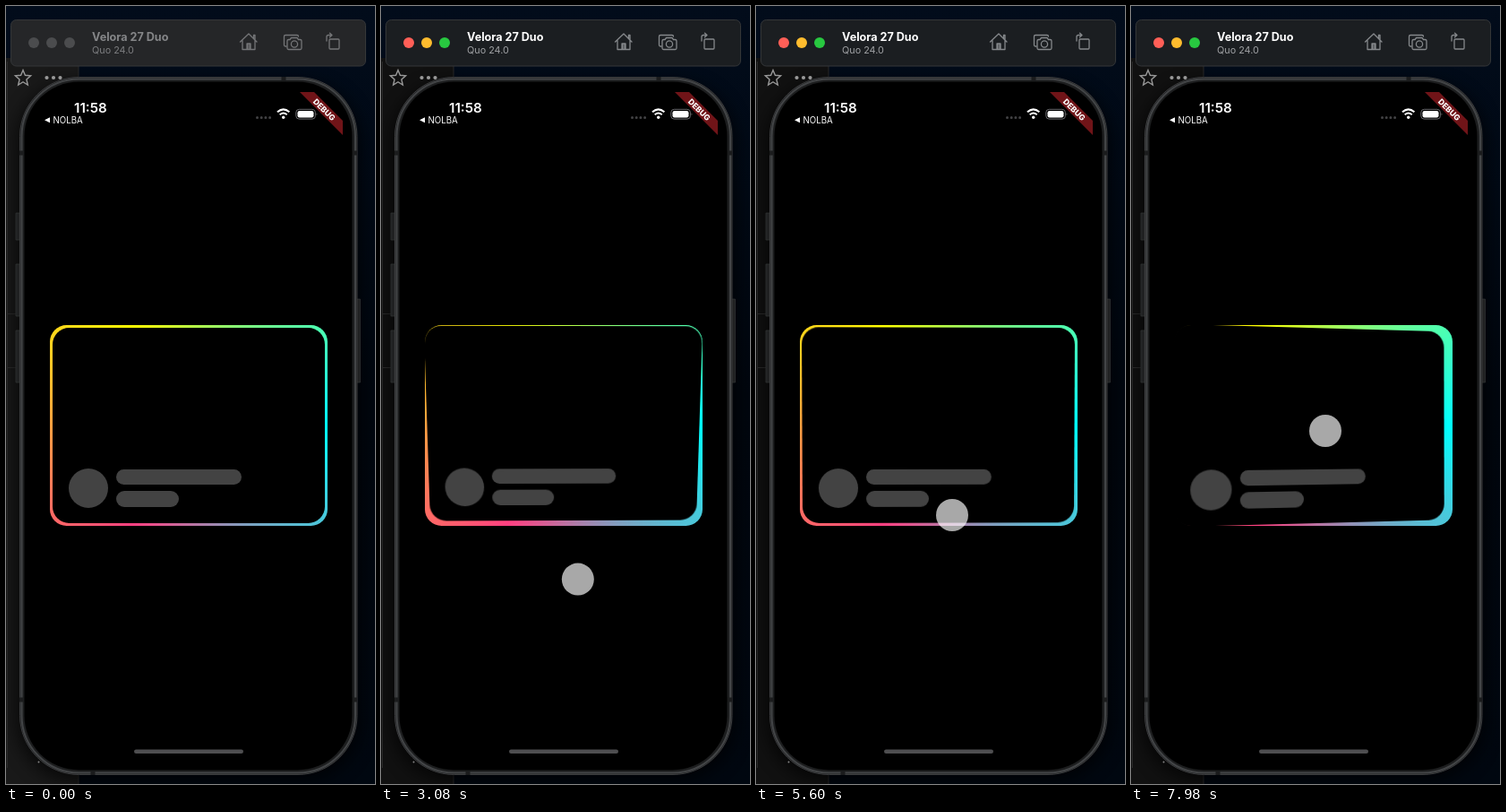
An HTML page for the animation above (8 s loop, 412x868 px).

```html
<!DOCTYPE html>
<html lang="en">
<head>
<meta charset="utf-8">
<title>Tilting card</title>
<style>
  html, body { margin: 0; width: 100%; height: 100%; overflow: hidden; background: #000; }
  #stage { position: absolute; inset: 0; width: 412px; height: 868px; overflow: hidden; --on: 0%; }
  #stage > *, #inner > * { position: absolute; }
  svg { left: 0; top: 0; font-family: Inter, sans-serif; }
  .bar { fill: color-mix(in srgb, #252628, #1b1e21 var(--on)); }
  .title { fill: color-mix(in srgb, #858688, #fff var(--on)); }
  .sub { fill: color-mix(in srgb, #7d7e80, #a0a2a5 var(--on)); }
  .icon { stroke: color-mix(in srgb, #747577, #85888b var(--on)); }
  .window { fill: color-mix(in srgb, #191919, #111 var(--on)); }
  .red { fill: color-mix(in srgb, #4b4c4e, #ff5f57 var(--on)); }
  .amber { fill: color-mix(in srgb, #4b4c4e, #febc2e var(--on)); }
  .green { fill: color-mix(in srgb, #4b4c4e, #28c840 var(--on)); }
  #card {
    left: 49px; top: 356.2px; width: 310px; height: 223.6px; border-radius: 18.6px;
    background: conic-gradient(from 90deg, #0ff, #ff4081, #ff0, #0ff);
  }
  #inner { left: 51.8px; top: 359px; width: 304.4px; height: 218px; border-radius: 18.6px; background: #000; }
  #inner > * { background: #434343; border-radius: 22px; }
  #avatar { left: 18px; top: 156.6px; width: 44px; height: 44px; }
  #line1 { left: 70.5px; top: 157.6px; width: 140px; height: 17.7px; }
  #line2 { left: 70.5px; top: 182.1px; width: 70px; height: 17.7px; }
  #finger {
    left: -18px; top: -18px; width: 36px; height: 36px; border-radius: 50%;
    background: rgba(255,255,255,.66);
  }
</style>
</head>
<body>
<div id="stage">
  <svg width="412" height="868">
    <defs>
      <linearGradient id="sky" x1="0" y1="0" x2="0" y2="1">
        <stop offset="0" stop-color="#020c1b"/><stop offset=".5" stop-color="#00060e"/><stop offset="1" stop-color="#000710"/>
      </linearGradient>
      <filter id="soft" x="-20%" y="-20%" width="140%" height="140%"><feGaussianBlur stdDeviation="10"/></filter>
    </defs>
    <rect width="412" height="868" fill="url(#sky)"/>

    <!-- window behind the phone -->
    <path class="window" d="M0 58H81V868H0Z"/>
    <path d="M1.5 62V850M81 66V868M2 343.5H15M2 403.5H15" fill="none" stroke="#2b2b2b"/>
    <rect x="12" y="86" width="384" height="778" rx="66" opacity=".7" filter="url(#soft)"/>
    <path d="M19 71.5L21.4 77.3L27.6 77.8L22.9 81.9L24.3 88L19 84.7L13.7 88L15.1 81.9L10.4 77.8L16.6 77.3Z" fill="none" stroke="#999" stroke-width="1.4"/>
    <g fill="#999"><circle cx="45.5" cy="80" r="2.1"/><circle cx="53" cy="80" r="2.1"/><circle cx="60.5" cy="80" r="2.1"/></g>

    <!-- phone body -->
    <path d="M11 231H16V261H11ZM11 288H16V346H11ZM11 362H16V420H11ZM391 327H395.5V420H391Z" fill="#202122" stroke="#333435" stroke-width=".7"/>
    <rect x="15.5" y="79.5" width="376.5" height="778" rx="66" fill="#1d1e1f" stroke="#3c3d3f"/>
    <rect x="17.5" y="81.5" width="372.5" height="774" rx="64" fill="none" stroke="#434547" stroke-width="2"/>
    <path d="M310 79V85M97 852V858M15 164H21M15 774H21M386 164H392M386 774H392" stroke="#1b1c1d" stroke-width="5"/>
    <rect x="20.5" y="84.5" width="366" height="768" rx="61"/>
    <circle cx="36.5" cy="843.5" r="1" fill="#888"/>

    <!-- simulator toolbar -->
    <rect class="bar" x="5.5" y="15.5" width="396" height="51.5" rx="6" stroke="#343638"/>
    <circle class="red" cx="31" cy="41" r="6"/><circle class="amber" cx="51" cy="41" r="6"/><circle class="green" cx="71" cy="41" r="6"/>
    <text class="title" x="96" y="39" font-size="12.6" font-weight="700">Velora 27 Duo</text>
    <text class="sub" x="96" y="53" font-size="10.8">Quo 24.0</text>
    <g class="icon" fill="none" stroke-width="1.3" stroke-linejoin="round" stroke-linecap="round">
      <path d="M261.5 40L271 31L280 40M264 38.5V48.5H278V38.5M276.5 36V32.5H278V37.5M269 48V42H273V48M270 43V48M272 43V48"/>
      <path d="M313 45H312Q310.5 45 310.5 43.5V34Q310.5 32.5 312 32.5H325Q326.5 32.5 326.5 34"/>
      <path d="M315.5 37.5H317L318.5 35.5H325L326.5 37.5H328.5Q330 37.5 330 39V47Q330 48.5 328.5 48.5H315.5Q314 48.5 314 47V39Q314 37.5 315.5 37.5Z"/>
      <circle cx="322" cy="42.5" r="3.6"/>
      <path d="M362 37H371Q372 37 372 38V47Q372 48 371 48H362Q361 48 361 47V38Q361 37 362 37ZM358 39V34.5Q358 32.5 360 32.5H363.5M361.5 30.2L364 32.5L361.5 34.8"/>
    </g>

    <!-- status bar -->
    <g fill="#fff">
      <text x="76" y="119" font-size="15.2" font-weight="600">11:58</text>
      <path d="M43 127.3L49 124.3V130.3Z"/>
      <text x="52.5" y="130.7" font-size="9.7">NOLBA</text>
      <rect x="325.5" y="117" width="18" height="7.5" rx="2.2"/>
      <path d="M346.7 119.2Q348.2 120.7 346.7 122.2Z" opacity=".5"/>
      <circle cx="309.7" cy="124.3" r="1.7"/>
    </g>
    <rect x="323.8" y="115.3" width="21.6" height="10.8" rx="3.5" fill="none" stroke="#77777a" stroke-width=".9"/>
    <path d="M303 118.3Q309.7 112.4 316.4 118.3M305.7 121.2Q309.7 117.8 313.7 121.2" fill="none" stroke="#fff" stroke-width="2"/>
    <path d="M280.5 124.5H296" stroke="#424244" stroke-width="3" stroke-linecap="round" stroke-dasharray="0 4.7"/>
    <path d="M328 96H344L376 128V144Z" fill="#701418"/>
    <text transform="translate(355.3 115.7) rotate(45)" y="3.2" text-anchor="middle" font-size="8.8" font-weight="800" fill="#fff">DEBUG</text>
    <rect x="143" y="829.5" width="122" height="4.5" rx="2.25" fill="#4e4e50"/>
  </svg>
  <div id="card"></div>
  <div id="inner"><div id="avatar"></div><div id="line1"></div><div id="line2"></div></div>
  <div id="finger"></div>
</div>
<script>
const LOOP = 8000, STEP = 70, DEG_PER_PX = 0.068, SPRING = 420;
// Each drag: points of [time, x, y]
const drags = [
  [[2100, 211, 556], [2520, 225, 584], [2870, 222, 627], [3780, 213, 674], [4060, 212, 714],
   [4340, 216, 650], [4550, 222, 540], [4760, 228, 346], [5040, 230, 310], [5110, 230, 310],
   [5600, 219, 568], [5950, 218, 607], [6160, 218, 624], [6300, 218, 624], [6440, 218, 665], [6510, 218, 665]],
  [[7210, 120, 478], [7490, 150, 477], [7630, 150, 477], [7980, 217, 474], [8000, 217, 474]]
];
const byId = id => document.getElementById(id);
const clamp = v => Math.min(1, Math.max(0, v));

// Monotone cubic through the points, for column c
function along(points, t, c) {
  const last = points.length - 1;
  if (t >= points[last][0]) return points[last][c];
  const slope = i => i < 0 || i >= last ? 0 :
    (points[i + 1][c] - points[i][c]) / (points[i + 1][0] - points[i][0]);
  const tangent = i => {
    const a = slope(i - 1), b = slope(i);
    return a * b <= 0 ? 0 : 2 * a * b / (a + b);
  };
  const i = points.findIndex(p => p[0] > t) - 1;
  const span = points[i + 1][0] - points[i][0], u = (t - points[i][0]) / span, v = 1 - u;
  return points[i][c] * (1 + 2 * u) * v * v + points[i + 1][c] * u * u * (3 - 2 * u)
    + span * (tangent(i) * u * v * v - tangent(i + 1) * u * u * v);
}

function draw(now) {
  const t = Math.floor(now % LOOP / STEP) * STEP;
  byId('stage').style.setProperty('--on', clamp((t - 1610) / 280) * 100 + '%');
  const drag = drags.findLast(d => t >= d[0][0]);
  let tiltX = 0, tiltY = 0, down = false;
  if (drag) {
    const x = along(drag, t, 1), y = along(drag, t, 2), end = drag.at(-1)[0];
    const pull = DEG_PER_PX * (1 - clamp((t - end) / SPRING)) ** 2;
    tiltX = (drag[0][2] - y) * pull;
    tiltY = (x - drag[0][1]) * pull;
    down = t <= end;
    byId('finger').style.transform = `translate(${x}px, ${y}px)`;
  }
  byId('finger').style.visibility = down ? 'visible' : 'hidden';
  byId('inner').style.transform = `perspective(465px) rotateX(${tiltX}deg) rotateY(${tiltY}deg)`;
}

const start = performance.now();
function tick() {
  draw(performance.now() - start);
  requestAnimationFrame(tick);
}
tick();
</script>
</body>
</html>
```
